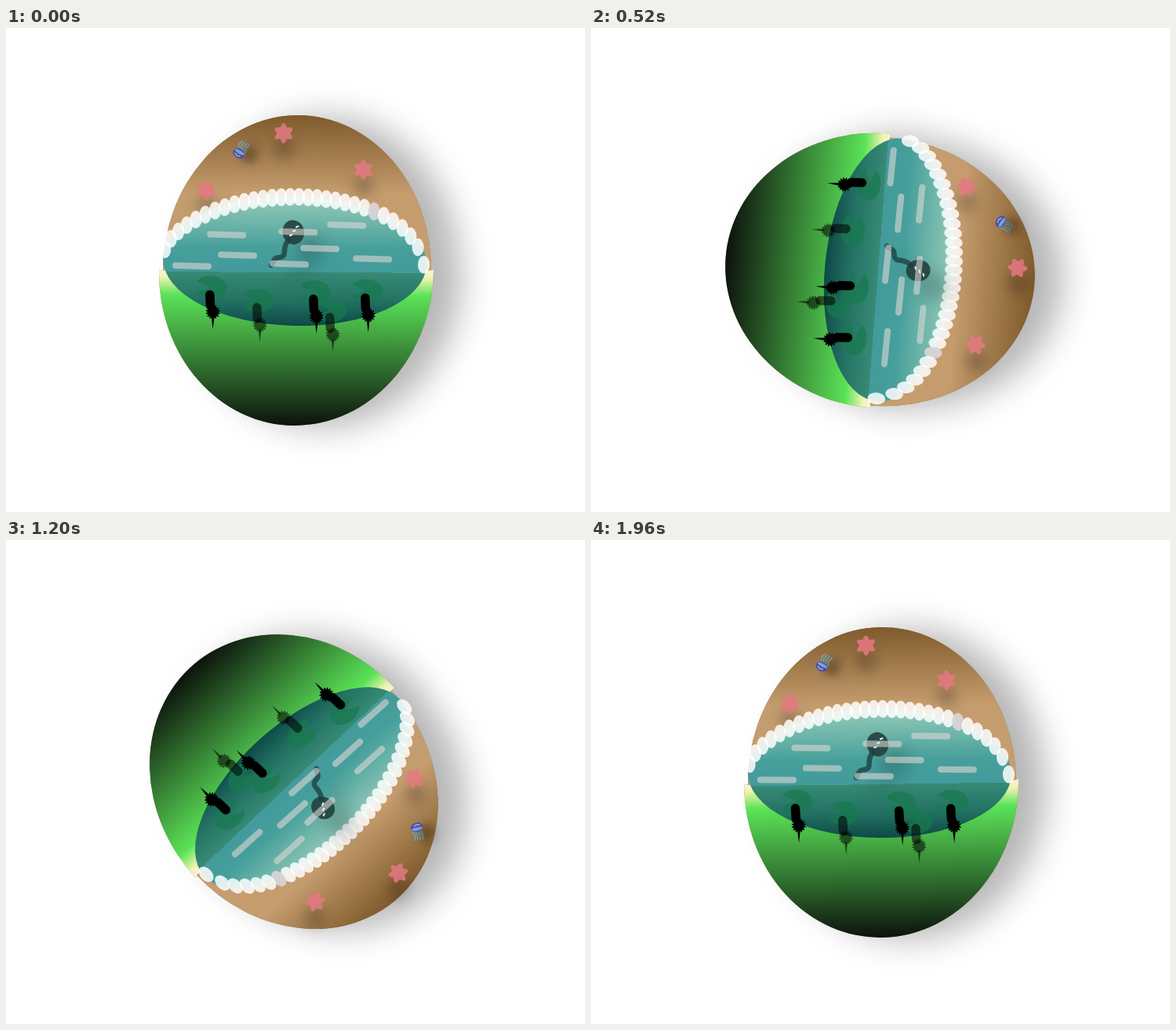
An HTML page with a canvas for the animation above (2 s loop, 738 px wide and 616 px high).

```html
<!DOCTYPE html>
<html lang="en">
<head>
<meta charset="utf-8">
<title>Rocking pond globe</title>
<style>
  html, body { margin: 0; width: 738px; height: 616px; overflow: hidden; background: #fff; }
  canvas { display: block; }
</style>
</head>
<body>
<canvas id="stage" width="738" height="616"></canvas>
<script>
const ctx = document.getElementById('stage').getContext('2d');
const W = 738, H = 616, LOOP = 2000, STEP = 40, TAU = Math.PI * 2;
const SWING = 181, LOWEST = -3.9, LEAD = 23;
const PEARLS = 30, GREY_PEARL = 23;
const FLOWERS = [[353, 134], [455, 180], [255, 207]];
const REEDS = [[264, 362], [396, 367], [462, 365], [324, 378], [417, 390]];
const RIPPLES = [[281, 263], [372, 259], [434, 250], [295, 289], [400, 280], [467, 293], [237, 303], [361, 300]];

const rad = deg => deg * Math.PI / 180;

// Steady swing to and fro.
function turnAt(t) {
  const phase = ((t + LEAD) % LOOP) / LOOP;
  return LOWEST + SWING * (1 - Math.abs(1 - 2 * phase));
}

function fade(y0, y1, stops) {
  const g = ctx.createLinearGradient(0, y0, 0, y1);
  stops.forEach(([at, color]) => g.addColorStop(at, color));
  return g;
}

function oval(x, y, rx, ry, color, rot = 0) {
  ctx.beginPath();
  ctx.ellipse(x, y, rx, ry, rot, 0, TAU);
  ctx.fillStyle = color;
  ctx.fill();
}

function stroke(points, width, color) {
  ctx.beginPath();
  points.forEach(([x, y]) => ctx.lineTo(x, y));
  ctx.lineWidth = width;
  ctx.lineCap = ctx.lineJoin = 'round';
  ctx.strokeStyle = color;
  ctx.stroke();
}

// Closed outline whose radius waves around the centre.
function bloom(x, y, r, wave, count, color) {
  ctx.beginPath();
  for (let a = 0; a < TAU; a += TAU / 120) {
    const d = r + wave * Math.cos(count * a);
    ctx.lineTo(x + d * Math.sin(a), y - d * Math.cos(a));
  }
  ctx.closePath();
  ctx.fillStyle = color;
  ctx.fill();
}

// Canvas shadows keep their screen direction while the globe turns.
function shaded(dx, dy, blur, alpha, draw) {
  ctx.save();
  ctx.shadowOffsetX = dx;
  ctx.shadowOffsetY = dy;
  ctx.shadowBlur = blur;
  ctx.shadowColor = `rgba(0,0,0,${alpha})`;
  draw();
  ctx.restore();
}

function globe() {
  const land = new Path2D(), sand = new Path2D(), both = new Path2D();
  const lean = rad(2.5), sandLean = rad(1);
  land.ellipse(370, 308, 175, 198, lean, -lean, Math.PI - lean);
  sand.ellipse(371, 308.5, 171, 197.5, sandLean, Math.PI - sandLean, TAU - sandLean);
  both.addPath(land);
  both.addPath(sand);
  shaded(36, 2, 44, .29, () => {
    ctx.fillStyle = '#8a7a50';
    ctx.fill(both);
  });
  ctx.fillStyle = fade(308, 507, [[0, '#faf3dc'], [.05, '#eef3b0'], [.16, '#5be358'], [1, '#0c110c']]);
  ctx.fill(land);
  ctx.fillStyle = fade(111, 308, [[0, '#7f5a2c'], [.5, '#c49c6d'], [1, '#c69e71']]);
  ctx.fill(sand);
}

// One lens; the colour breaks at the waterline.
function water() {
  oval(368, 297, 168, 82, fade(215, 379, [[0, '#95cbb8'], [.4, '#469f9b'], [.585, '#429b9b'],
    [.585, '#378a75'], [.8, '#237263'], [1, '#0d4a47']]), rad(1.2));
}

function pad([x, y]) {
  ctx.beginPath();
  ctx.moveTo(x - 3, y - 31);
  ctx.ellipse(x - 3, y - 31, 21, 15, 0, rad(212), rad(515));
  ctx.fillStyle = 'rgba(24,122,78,.7)';
  ctx.fill();
}

function reed([x, y], i) {
  ctx.save();
  ctx.globalAlpha = i < 3 ? 1 : .55;
  stroke([[x - 4, y - 22], [x - 3.3, y - 8]], 11.5, '#000');
  bloom(x, y, 8, 1.3, 14, '#000');
  ctx.beginPath();
  ctx.moveTo(x - 2, y + 6);
  ctx.lineTo(x + 2, y + 6);
  ctx.lineTo(x, y + 22);
  ctx.fill();
  ctx.restore();
}

// Pearls bunch up towards both ends of the upper shore.
function pearl(i) {
  const u = 2 * i / (PEARLS - 1) - 1;
  const dx = 165 * u + 35 * u ** 3 * (1 - u * u);
  const y = 301 - 86 * Math.sqrt(1 - (dx / 166) ** 2) + 9 * u ** 9;
  oval(367.5 + dx, y, 7.6, 11.3, i === GREY_PEARL ? 'rgba(216,212,216,.95)' : 'rgba(255,255,255,.84)');
}

function tadpole() {
  shaded(23, 21, 24, .3, () => {
    ctx.beginPath();
    ctx.moveTo(360, 270);
    ctx.bezierCurveTo(350, 280, 360, 290, 349, 292);
    ctx.bezierCurveTo(340, 292, 342, 298, 338, 302);
    ctx.lineWidth = 6.5;
    ctx.lineCap = 'round';
    ctx.strokeStyle = 'rgba(32,72,72,.85)';
    ctx.stroke();
    oval(366, 260, 13.8, 15.5, 'rgba(32,62,60,.88)', rad(-12));
  });
}

function spots() {
  for (let i = 0; i < 6; i++) {
    oval(362 + 2 * i, 264 - 2.7 * i + 2 * (i % 2), 1.2, 1.2, '#eef2f0');
  }
}

function jellyfish() {
  shaded(12, 4, 14, .4, () => {
    ctx.save();
    ctx.translate(296, 160);
    ctx.rotate(rad(31));
    for (let x = -5; x < 7; x += 3.4) {
      stroke([[x, -2], [x + 1.3, -6], [x - .8, -10], [x + .6, -16]], 1.5, '#74a9bb');
    }
    oval(0, 0, 8, 6, '#5b4fa8');
    oval(0, -2, 7, 2, '#70a9d4');
    stroke([[-4, 2], [-1, 3.6], [3, 2.4]], 1.3, '#9cc0e6');
    ctx.restore();
  });
}

function ripple([x, y]) {
  stroke([[x - 21, y], [x + 21, y + 1]], 8, 'rgba(220,215,212,.6)');
}

function scene(t) {
  ctx.fillStyle = '#fff';
  ctx.fillRect(0, 0, W, H);
  ctx.save();
  ctx.translate(W / 2, H / 2);
  ctx.rotate(rad(turnAt(t)));
  ctx.translate(-W / 2, -H / 2);
  globe();
  FLOWERS.forEach(([x, y]) => shaded(0, 20, 18, .38, () =>
    bloom(x, y, 10.7, 2.1, 6, 'rgba(228,120,130,.85)')));
  jellyfish();
  water();
  REEDS.forEach(pad);
  REEDS.forEach(reed);
  for (let i = 0; i < PEARLS; i++) pearl(i);
  tadpole();
  RIPPLES.forEach(ripple);
  spots();
  ctx.restore();
}

const start = performance.now();
function tick() {
  const t = (performance.now() - start) % LOOP;
  scene(Math.floor(t / STEP) * STEP);
  requestAnimationFrame(tick);
}
tick();
</script>
</body>
</html>
```
